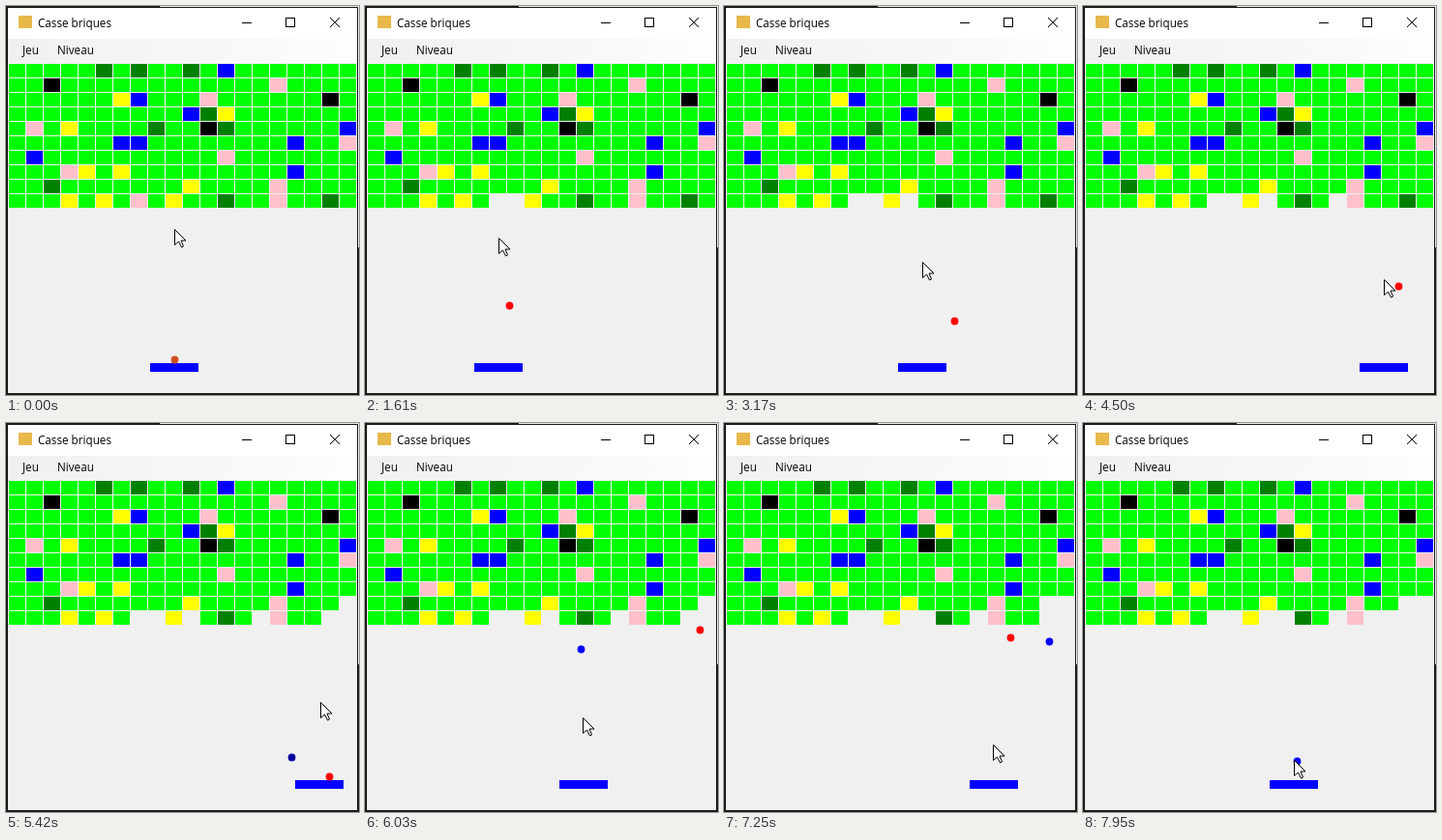
An HTML page with a canvas that plays this animation: 365 px wide and 403 px high, repeating every 7.99 s.

```html
<!DOCTYPE html>
<html lang="fr">
<head>
<meta charset="utf-8">
<title>Casse briques</title>
<style>
html, body { margin: 0; width: 100%; height: 100%; overflow: hidden; background: #1b1b1b; }
canvas { display: block; }
</style>
</head>
<body>
<canvas id="stage" width="365" height="403"></canvas>
<script>
const LOOP = 7990, LAUNCH = 636, HOP = 593.5, DRIFT = 39.4;
const TOP = 214, BOTTOM = 366, WALL_X = 359.5;
const ctx = document.getElementById('stage').getContext('2d');

const COLORS = { '.': '#00ff00', g: '#008000', b: '#0000ff', k: '#000000', p: '#ffc0cb', y: '#ffff00' };
const BRICKS = [
  '.....g.g..g.b.......',
  '..k............p....',
  '......yb...p......k.',
  '..........bgy.......',
  '.p.y....g..kg......b',
  '......bb........b..p',
  '.b..........p.......',
  '...py.y.........b...',
  '..g.......y....p....',
  '...y.y.p.y..g..p..g.'
];

// A hop runs between paddle and bricks: sideways drift, duration, bricks broken at its end
const hop = (dx, time = HOP, hits = '') => ({ dx, time, hits });
const brokenAt = {};

const red = makeBall(LAUNCH, 149, true, [
  hop(0, HOP, '9,7 9,8'), hop(0),
  hop(DRIFT, HOP, '9,10'), hop(DRIFT),
  hop(DRIFT, HOP, '9,14'), hop(DRIFT),
  hop(DRIFT, HOP, '9,18 9,19 8,19'), hop(DRIFT, 615),
  hop(DRIFT, 610, '8,18'), hop(DRIFT, 675),
  hop(-DRIFT, HOP, '9,16'), hop(-DRIFT)
]);
const blue = makeBall(4792, 336, false, [
  hop(-47, 710), hop(-77, HOP, '9,11'), hop(65, 612),
  hop(115, 590, '9,17'), hop(-100, 576), hop(-60)
]);

// Pointer stops: time, x, y; the paddle follows it
const MOUSE = [
  [290, 174, 231], [700, 149, 210], [1120, 152, 212], [1400, 133, 232],
  [1610, 138, 240], [1850, 138, 244], [2680, 240, 258], [3170, 205, 265],
  [3340, 179, 268], [4330, 311, 283], [5300, 311, 288], [5450, 328, 289],
  [5540, 300, 291], [6240, 199, 310], [6740, 302, 324], [7500, 270, 336],
  [7930, 218, 349]
];

function fold(x) {
  return x > WALL_X ? 2 * WALL_X - x : x;
}

function makeBall(start, x, up, hops) {
  let t = start;
  for (const h of hops) {
    Object.assign(h, { start: t, x, up });
    t += h.time;
    x = fold(x + h.dx);
    up = !up;
    for (const key of h.hits.split(' ')) brokenAt[key] = t;
  }
  return hops;
}

function ballAt(hops, t) {
  const h = hops.find(h => t >= h.start && t < h.start + h.time);
  if (!h) return null;
  const k = (t - h.start) / h.time;
  const rise = (BOTTOM - TOP) * (h.up ? k : 1 - k);
  return [fold(h.x + h.dx * k), BOTTOM - 4 * Math.round(rise / 4)]; // 4 px steps
}

function mouseAt(t) {
  const i = MOUSE.findIndex(p => p[0] > t);
  if (i <= 0) return MOUSE.at(i).slice(1);
  const [t0, x0, y0] = MOUSE[i - 1], [t1, x1, y1] = MOUSE[i];
  const k = (t - t0) / (t1 - t0), ease = k * k * (3 - 2 * k);
  return [x0 + (x1 - x0) * ease, y0 + (y1 - y0) * ease];
}

function box(x, y, w, h, color) {
  ctx.fillStyle = color;
  ctx.fillRect(x, y, w, h);
}

function label(text, x, y) {
  ctx.fillStyle = '#000';
  ctx.font = '11.7px "Open Sans", "Noto Sans", sans-serif';
  ctx.fillText(text, x, y);
}

function drawWindow() {
  box(0, 0, 365, 403, '#1b1b1b');
  box(159, 0, 206, 1, '#e8e8e8');
  box(364, 0, 1, 250, '#e8e8e8');
  box(2, 2, 361, 399, '#f0f0f0');
  box(2, 2, 361, 32, '#fff');
  const shine = ctx.createLinearGradient(2, 0, 363, 0);
  shine.addColorStop(0, '#f0f0f0');
  shine.addColorStop(1, '#fdfdfd');
  box(2, 34, 361, 25, shine);
  box(13, 10, 14, 13, '#e8b84a');
  label('Casse briques', 33, 22);
  label('Jeu', 17, 50);
  label('Niveau', 53, 50);
  box(244, 17, 10, 1, '#000');
  ctx.strokeStyle = '#000';
  ctx.lineWidth = 1;
  ctx.strokeRect(289.5, 12.5, 9, 9);
  ctx.beginPath();
  ctx.moveTo(335, 12); ctx.lineTo(345, 22);
  ctx.moveTo(345, 12); ctx.lineTo(335, 22);
  ctx.stroke();
}

function drawBricks(t) {
  BRICKS.forEach((row, r) => [...row].forEach((kind, c) => {
    if (t >= brokenAt[r + ',' + c]) return;
    box(3 + 18 * c, 60 + 15 * r, 17, 14, COLORS[kind]);
  }));
}

function drawBall(at, color) {
  if (!at) return;
  ctx.fillStyle = color;
  ctx.beginPath();
  ctx.arc(Math.round(at[0]) + 0.5, at[1] + 0.5, 3.9, 0, 7);
  ctx.fill();
}

function drawPointer([x, y]) {
  const shape = [[0, 0], [0, 16], [4, 12.5], [7, 18.5], [9, 17.5], [6.5, 11.5], [11.5, 11.5]];
  ctx.beginPath();
  for (const [dx, dy] of shape) ctx.lineTo(Math.round(x) + 0.5 + dx, Math.round(y) + 0.5 + dy);
  ctx.closePath();
  ctx.fillStyle = '#fff';
  ctx.fill();
  ctx.stroke();
}

function draw(now) {
  const t = Math.floor((now % LOOP - 10) / 40) * 40 + 10; // 25 steps a second
  const mouse = mouseAt(t);
  drawWindow();
  drawBricks(t);
  box(Math.round(mouseAt(t - 10)[0]) - 25, 370, 50, 9, '#0000ff');
  if (t < LAUNCH) drawBall([mouse[0], BOTTOM], '#d2501e');
  drawBall(ballAt(red, t), '#ff0000');
  drawBall(ballAt(blue, t), t < blue[1].start ? '#0000a0' : '#0000ff');
  drawPointer(mouse);
  requestAnimationFrame(draw);
}
requestAnimationFrame(draw);
</script>
</body>
</html>
```
